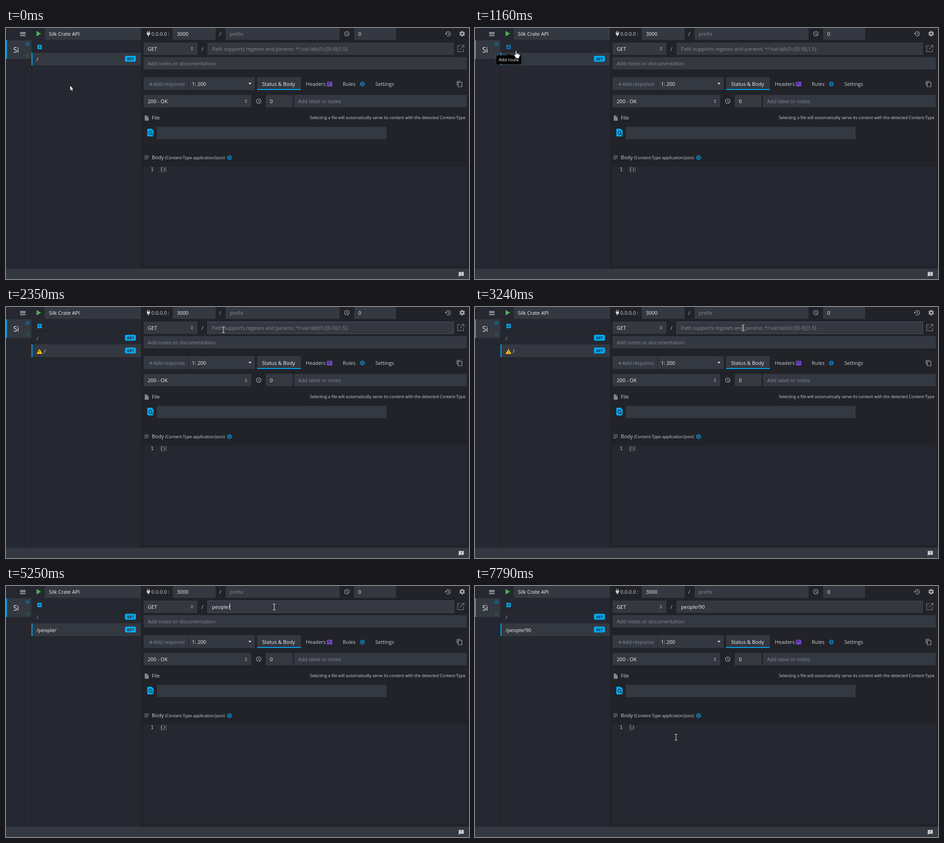
Animation, 1016 px wide and 551 px high, one loop 8000 ms. Source, as an HTML page with a canvas:

```html
<!DOCTYPE html>
<html lang="en">
<head>
<meta charset="utf-8">
<title>Mock API editor</title>
<style>
html, body { margin: 0; width: 100%; height: 100%; overflow: hidden; background: #212329; }
canvas { display: block; width: 1016px; height: 551px; }
</style>
</head>
<body>
<canvas id="stage" width="1016" height="551"></canvas>
<script>
const ctx = document.getElementById('stage').getContext('2d');
const LOOP = 8000;
const SANS = '"Open Sans", "Noto Sans", sans-serif';
const MONO = '"Noto Sans Mono", "DejaVu Sans Mono", monospace';
const C = {
  main: '#212329', panel: '#252830', field: '#343841', line: '#1d1f25', focus: '#4d5263',
  white: '#f2f3f5', text: '#cdd0d5', muted: '#858992', icon: '#a9acb3', faint: '#6b6f79',
  blue: '#03a9f4', deepBlue: '#0b6f9f', purple: '#6f42c1', green: '#4caf50', yellow: '#ffc107'
};

const ADD_AT = 1610, BLUR_AT = 7240;
const typing = [
  [3630, 'p'], [3780, 'pe'], [3870, 'peo'], [4230, 'peop'], [4320, 'peopl'],
  [4600, 'people'], [5160, 'people/'], [5800, 'people/90']
];
const caretOn = [[1610, 2140], [2670, 3240], [3630, 6370], [6910, 7240]];

// Pointer legs: start, time of last step, steps, target x, target y, easing
const easeOut = p => 1 - (1 - p) ** 2;
const easeInOut = p => p * p * (3 - 2 * p);
const legs = [
  [460, 1250, 10, 88, 47, easeOut],
  [1340, 1430, 2, 82, 42, easeOut],
  [1800, 2350, 7, 477, 50, easeInOut],
  [2440, 2890, 6, 588.5, 46, easeOut],
  [6640, 7150, 7, 441, 332, easeInOut]
];
const textZones = [[442, 32, 983, 59], [302, 64, 1011, 91], [570, 147, 628, 174], [331, 217, 834, 243], [338, 304, 1011, 522]];

function rect(x, y, w, h, color) {
  ctx.fillStyle = color;
  ctx.fillRect(x, y, w, h);
}
function round(x, y, w, h, r, color) {
  ctx.fillStyle = color;
  ctx.beginPath();
  ctx.roundRect(x, y, w, h, r);
  ctx.fill();
}
function disc(x, y, r, color) {
  ctx.fillStyle = color;
  ctx.beginPath();
  ctx.arc(x, y, r, 0, 7);
  ctx.fill();
}
function fill(d, color) {
  ctx.fillStyle = color;
  ctx.fill(new Path2D(d));
}
function stroke(d, color, width = 1) {
  ctx.strokeStyle = color;
  ctx.lineWidth = width;
  ctx.stroke(new Path2D(d));
}
function label(s, x, y, color = C.white, font = '11.1px ' + SANS, align = 'left') {
  ctx.font = font;
  ctx.textAlign = align;
  ctx.fillStyle = color;
  ctx.fillText(s, x, y);
}
function field(x, y, w, h, s = '', color = C.white) {
  rect(x, y, w, h, C.field);
  label(s, x + 9, Math.round(y + h / 2 + 4), color);
}
function at(x, y, draw) {
  ctx.save();
  ctx.translate(x, y);
  draw();
  ctx.restore();
}

const clock = (x, y) => at(x, y, () => {
  stroke('M5 0A5 5 0 1 1 -5 0A5 5 0 1 1 5 0M0 -3V.5L2.3 2', C.icon, 1.2);
});
const sorter = (x, y) => at(x, y, () => fill('M-3 -1L0 -4.2L3 -1ZM-3 1L0 4.2L3 1Z', C.muted));
const info = (x, y) => {
  disc(x, y, 5.4, C.deepBlue);
  rect(x - .6, y - 1, 1.2, 3.6, C.main);
  rect(x - .6, y - 3, 1.2, 1.2, C.main);
};
function gear(x, y) {
  at(x, y, () => {
    for (let i = 0; i < 6; i++) {
      rect(-1.7, -6, 3.4, 4, C.icon);
      ctx.rotate(Math.PI / 3);
    }
    disc(0, 0, 4.4, C.icon);
    disc(0, 0, 2, C.main);
  });
}

function drawTopBar() {
  for (const y of [9, 12, 16]) rect(31, y, 12, 1.5, C.text);
  fill('M67 6.5L77 12.5L67 18.5Z', C.green);
  field(85, 0, 211, 26, 'Silk Crate API');
  at(312.5, 12.5, () => {
    fill('M-4 -2.5H4V-1H3.3V1Q3.2 3 .8 3.5V6H-.8V3.5Q-3.2 3 -3.3 1V-1H-4Z', C.text);
    rect(-2.6, -6, 1.5, 3, C.text);
    rect(1.1, -6, 1.5, 3, C.text);
  });
  label('0.0.0.0 :', 319, 17, C.text, '11px ' + SANS);
  field(366, 0, 94, 26, '3000');
  label('/', 468, 17, C.text);
  field(482, 0, 250, 26, 'prefix', C.muted);
  clock(748, 12.5);
  field(764, 0, 92, 26, '0');
  at(970, 12.5, () => {
    stroke('M-4.4 0A4.9 4.9 0 1 1 -3 3.6M.5 -2.8V.5L2.8 1.9', C.icon, 1.2);
    fill('M-7 -.5H-2L-4.5 2.3Z', C.icon);
  });
  gear(1001, 12.5);
}

function drawRow(y, path, active, glow, warn) {
  if (active) {
    rect(56, y, 240, 28, C.field);
  } else {
    ctx.globalAlpha = glow;
    rect(57, y, 239, 28, C.field);
    ctx.globalAlpha = 1;
  }
  if (warn) {
    fill(`M73.5 ${y + 10}L80 ${y + 21}H67Z`, C.yellow);
    rect(73, y + 14, 1, 4, C.field);
    rect(73, y + 19, 1, 1, C.field);
  }
  label(path, warn ? 83 : 67, y + 19, active || glow > .3 ? C.white : '#a5a8af');
  round(261, y + 7, 24, 13, 3, C.blue);
  label('GET', 273, y + 17, '#212936', 'bold 8.3px ' + SANS, 'center');
}

function drawSidebar(t, path, hover) {
  rect(0, 27, 56, 41, C.field);
  rect(0, 27, 2, 41, C.blue);
  label('Si', 16, 54, C.white, '15.5px ' + SANS);
  disc(46.7, 34.7, 4.2, C.deepBlue);
  fill('M44 32L47 31L48 33L46 34.5L47 37L45 36ZM48.5 35L50 34.5L49 37.3Z', C.field);
  stroke('M43 58.5H44.5L48 63.5H50M43 63.5H44.5L48 58.5H50M49 57L50.5 58.5L49 60M49 62L50.5 63.5L49 65', '#246b58');

  round(69, 37, 9.5, 9.5, 1, hover ? '#0877b0' : C.blue);
  rect(71, 41.2, 5.5, 1.2, C.panel);
  rect(73.2, 39, 1.2, 5.5, C.panel);
  rect(56, 53, 240, 1, C.line);
  rect(56, 27, 1, 501, C.line);

  const added = t >= ADD_AT;
  const glow = added ? .7 * Math.max(0, 1 - (t - ADD_AT) / 300) : 0;
  drawRow(54, '/', !added, glow, false);
  if (added) drawRow(82, '/' + path, true, 0, !path);
  rect(56, added ? 82 : 54, 2, 28, C.blue);
}

function drawRoute(t, path) {
  field(302, 32, 118, 27, 'GET');
  sorter(408, 45.5);
  label('/', 429, 50, C.text);
  rect(442, 32, 541, 27, C.field);
  if (t >= ADD_AT && t < BLUR_AT) {
    ctx.globalAlpha = Math.min(1, (t - ADD_AT) / 150);
    ctx.strokeStyle = C.focus;
    ctx.lineWidth = 1;
    ctx.strokeRect(442.5, 32.5, 540, 26);
    ctx.globalAlpha = 1;
  }
  if (path) label(path, 452, 50);
  else label('Path supports regexes and params: */:var/a(b)?c/[0-9]{1,5}', 452, 50, C.muted, '11px ' + SANS);
  if (caretOn.some(([a, b]) => t >= a && t < b)) {
    ctx.font = '11.1px ' + SANS;
    rect(Math.floor(452 + ctx.measureText(path).width), 38, 1, 15, C.white);
  }
  stroke('M997 39H991V52H1004V46M999.5 38H1005V43.5M1005 38L996 47', C.faint, 1.5);
  field(302, 64, 709, 27, 'Add notes or documentation', C.muted);
}

function drawResponse() {
  rect(302, 108, 98, 28, C.field);
  stroke('M314 123.5H322M318 119.5V127.5', C.muted, 1.2);
  label('Add response', 323.5, 127, C.muted, '10.8px ' + SANS);
  rect(401, 108, 145, 28, C.field);
  label('1: 200', 408, 127);
  fill('M532 120.5H538.5L535.2 124Z', C.white);

  rect(551, 108, 96, 28, C.field);
  rect(551, 134, 96, 2, C.blue);
  label('Status & Body', 562, 127);
  label('Headers', 658, 127, C.text);
  round(704, 118, 12, 10.5, 1, C.purple);
  rect(706, 120.5, 6, 1, C.main);
  rect(706, 123, 3, 1, C.main);
  label('Rules', 739, 127, C.text);
  info(782, 123);
  label('Settings', 810.5, 127, C.text);
  stroke('M990 126V117H998M992.5 119.5H1000.5V129H992.5Z', C.icon, 1.2);

  field(302, 147, 236, 27, '200 - OK');
  sorter(526.5, 161);
  clock(554.5, 160.5);
  field(570, 147, 59, 27, '0');
  field(632, 147, 379, 27, 'Add label or notes', C.muted);

  fill('M304.5 192H309.5L313 195.5V203.5H304.5Z', C.muted);
  stroke('M309.5 192.5V195.5H312.5', C.main, .8);
  label('File', 320, 201, C.text);
  label('Selecting a file will automatically serve its content with the detected Content-Type',
    1008, 200, C.text, '9.04px ' + SANS, 'right');
  rect(302, 205, 709, 1, C.line);

  fill('M312 221H319.5L324 225.5V236Q324 238 322 238H312Q310 238 310 236V223Q310 221 312 221Z', C.blue);
  stroke('M320.5 230A3.5 3.5 0 1 1 313.5 230A3.5 3.5 0 1 1 320.5 230M319.5 232.5L323.5 236.5', C.main, 1.3);
  rect(331, 217, 504, 27, C.field);

  for (const [y, w] of [[280, 9], [282.5, 9], [285, 9], [287.5, 6]]) rect(304, y, w, 1, C.muted);
  label('Body', 320, 288, C.text);
  label('(Content-Type application/json)', 349, 288, C.text, '9.04px ' + SANS);
  info(490.5, 284.5);
  rect(302, 291, 709, 1, C.line);
}

function drawEditor(t) {
  rect(302, 304, 709, 218, C.panel);
  label('1', 317.5, 314, C.text, '11px ' + MONO);
  label('{}', 338, 314, '#b9bcc3', '11px ' + MONO);
  ctx.strokeStyle = '#3f434d';
  ctx.lineWidth = 1;
  ctx.strokeRect(338.5, 304.5, 6, 12);
  if (t < BLUR_AT) rect(351, 304, 1, 13, C.faint);
  else if (t < 7790) rect(351, 303, 1.5, 14, C.white);
}

function drawFooter() {
  rect(0, 528, 1016, 23, C.field);
  rect(0, 528, 1016, 1, '#2b2e36');
  fill('M993.5 535.5H1004.5V544H996L993.5 546.5Z', C.text);
  rect(998.5, 537, 1.2, 3.2, C.field);
  rect(998.5, 541.2, 1.2, 1.2, C.field);
}

function drawTooltip() {
  ctx.globalAlpha = .9;
  round(47, 60, 54.5, 19.5, 3, '#000');
  fill('M70 60L74 56.5L78 60Z', '#000');
  ctx.globalAlpha = 1;
  label('Add route', 74, 73, C.white, '9.5px ' + SANS, 'center');
}

function pointerAt(t) {
  let x = 140, y = 126;
  for (const [start, last, steps, tx, ty, ease] of legs) {
    if (t < start) break;
    const gap = (last - start) / (steps - 1);
    const p = ease(Math.min(1, (Math.floor((t - start) / gap + 1e-6) + 1) / steps));
    x += (tx - x) * p;
    y += (ty - y) * p;
  }
  return [Math.round(x * 2) / 2, Math.round(y * 2) / 2];
}

const shapes = {
  arrow() {
    const d = 'M.5 0V11.8L3.1 9.3L4.9 13.3L6.8 12.5L5 8.6H8.5Z';
    fill(d, '#fff');
    stroke(d, '#111', .8);
  },
  hand() {
    const d = 'M-1.3 9V1Q-1.3 0 0 0Q1.3 0 1.3 1V5.2Q3.6 4.7 3.8 6Q6 5.4 6.2 6.8Q8.3 6.4 8.3 8.3V11.5L6.9 14.5V16.7H-.7V15L-4.2 10.2Q-4.8 8.6 -3.2 8.4Z';
    fill(d, '#fff');
    stroke(d, '#111', .9);
    stroke('M1.3 5V8M3.8 6V8.5M6.2 6.8V9', '#111', .7);
  },
  beam() {
    stroke('M-3 -6.5H-1L0 -5.8L1 -6.5H3M0 -6V6M-3 6.5H-1L0 5.8L1 6.5H3', '#e8e8e8', 1.1);
  }
};

function draw(now) {
  const t = now % LOOP;
  const path = typing.reduce((s, [time, value]) => t >= time ? value : s, '');
  const [x, y] = pointerAt(t);
  const hover = x < 97 && y < 55;
  const inText = textZones.some(([l, top, r, b]) => x >= l && x < r && y >= top && y < b);

  rect(0, 0, 1016, 551, C.main);
  rect(0, 0, 296, 528, C.panel);
  drawTopBar();
  drawSidebar(t, path, hover);
  drawRoute(t, path);
  drawResponse();
  drawEditor(t);
  drawFooter();
  if (t >= 1070 && t < ADD_AT) drawTooltip();
  at(x, y, shapes[hover ? 'hand' : inText ? 'beam' : 'arrow']);
  requestAnimationFrame(draw);
}
requestAnimationFrame(draw);
</script>
</body>
</html>
```
